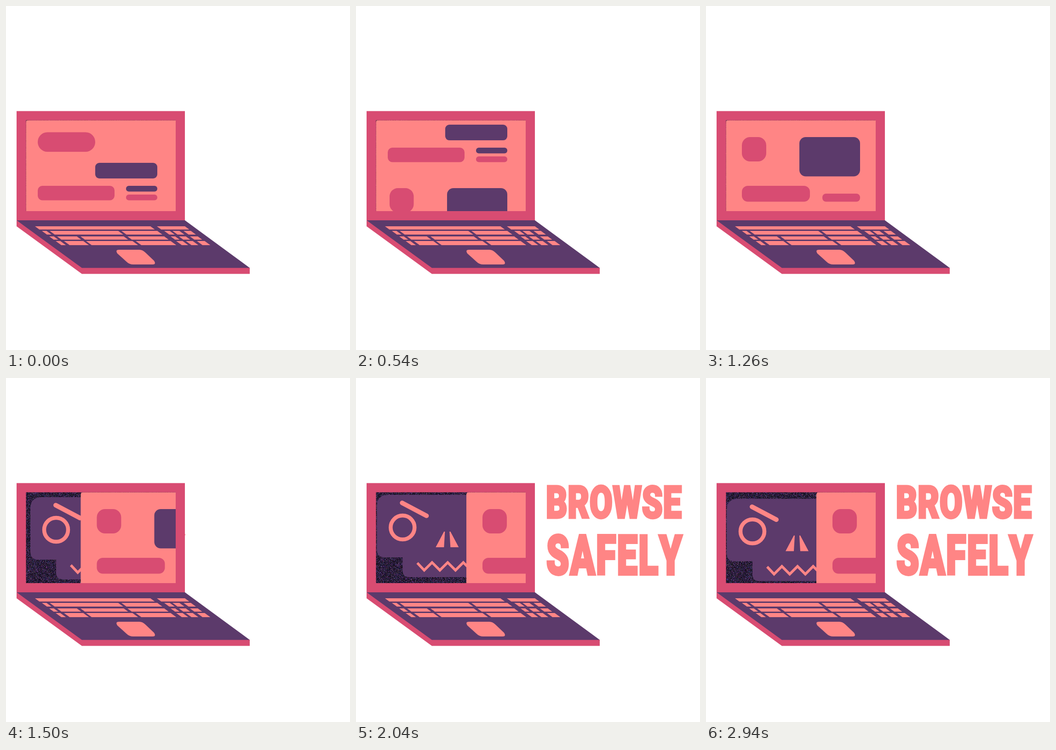
Animation, 748 px wide and 748 px high, one loop 3000 ms. Source, as an HTML page with a canvas:

```html
<!DOCTYPE html>
<html lang="en">
<head>
<meta charset="utf-8">
<title>Browse safely</title>
<style>
  html, body { margin: 0; width: 100%; height: 100%; overflow: hidden; background: #fff; }
  #noise { position: absolute; left: 43px; top: 248px; }
  svg { position: absolute; left: 0; top: 0; }
  .pink { fill: #d84c72; }
  .plum { fill: #5c3a6b; }
  .rose { fill: #ff8585; }
  .line { fill: none; stroke: #ff8585; }
  text {
    font-family: Roboto, "Liberation Sans", sans-serif;
    font-weight: 900;
    font-kerning: none;
    fill: #ff8585;
    stroke: #ff8585;
  }
</style>
</head>
<body>
<canvas id="noise" width="327" height="199"></canvas>
<svg width="748" height="748" viewBox="0 0 748 748">
  <defs>
    <clipPath id="screen"><rect x="43.5" y="248.5" width="325.5" height="197.5"/></clipPath>
    <clipPath id="outside"><rect x="389" y="200" width="359" height="260"/></clipPath>
  </defs>

  <g clip-path="url(#outside)">
    <g id="title">
      <text transform="translate(413 303.5) scale(.75 1)" font-size="96" letter-spacing="1" stroke-width="5">BROWSE</text>
      <text transform="translate(414 427) scale(.67 1)" font-size="118" letter-spacing="3.5" stroke-width="6">SAFELY</text>
    </g>
  </g>

  <g clip-path="url(#screen)">
    <g id="skull">
      <path class="plum" d="M76 255H400V434H122Q107 434 107 419V391H68Q51 391 51 374V280Q51 255 76 255Z"/>
      <circle class="line" cx="107" cy="326" r="26" stroke-width="8.500"/>
      <path class="line" d="M106 272.500L159 300.500" stroke-width="10" stroke-linecap="round"/>
      <path class="rose" d="M179 369L197 335H199L197 369ZM229 369L211 335H209L211 369Z"/>
      <path class="line" d="M139 403L154 419L171 402L188 419L205 402L222 419L239 402L256 419" stroke-width="5.500"/>
    </g>
    <g id="page">
      <path class="rose" d="M43 470V254Q43 248 49 248H380V470Z"/>
      <g id="feed"></g>
      <g id="face"></g>
    </g>
  </g>

  <path class="pink" fill-rule="evenodd" d="M23 228.500H389V466H23ZM43.500 248.500V446H369V248.500Z"/>
  <path class="pink" d="M23 466V479L165 582.500H530V569L165 560Z"/>
  <path class="plum" d="M23 466H389L530 569.500H165Z"/>
  <g id="keys" class="rose"></g>
  <path class="rose" d="M246 530H290Q297 530 303 536L322 554Q327 562 319 562H277Q268 562 262 556L242 538Q237 530 246 530Z"/>
</svg>
<script>
const LOOP = 3000, STEP = 60, SLANT = 1.365;
const $ = id => document.getElementById(id);

function add(parent, tag, attrs) {
  const el = document.createElementNS("http://www.w3.org/2000/svg", tag);
  for (const name in attrs) el.setAttribute(name, attrs[name]);
  parent.append(el);
}
const block = (parent, color, x, y, width, height, rx) =>
  add(parent, "rect", { class: color, x, y, width, height, rx });

const feed = $("feed"), face = $("face");
block(feed, "pink", 69, 274.5, 125, 42.5, 21);
block(feed, "plum", 194, 341, 135, 34, 9);
block(feed, "pink", 69, 391, 167, 31.5, 10);
block(feed, "plum", 261, 391, 68, 12.5, 6);
block(feed, "pink", 261, 410, 68, 12.5, 6);
block(feed, "pink", 73, 479, 52.5, 53, 18);
block(feed, "plum", 198, 479, 131, 86, 14);

block(face, "pink", 78, 285, 53, 53, 18);
block(face, "plum", 203, 285, 132, 85.5, 14);
block(face, "pink", 78, 391, 148, 34.5, 13);
block(face, "pink", 253, 408, 82, 17.5, 8);

// Each row: top, bottom, then the left and right end of every key.
const rows = [
  [479, 486, 63, 314, 328, 389],
  [489, 497, 78, 88, 95, 244, 251, 329, 344, 356, 362, 377, 386, 402],
  [501, 508, 94, 104, 111, 154, 162, 256, 264, 344, 358, 368, 376, 391, 400, 417],
  [511, 520, 108, 118, 126, 168, 174, 275, 282, 358, 370, 384, 391, 406, 415, 432]
];
for (const [top, bottom, ...ends] of rows) {
  const shift = (bottom - top) * SLANT;
  for (let i = 0; i < ends.length; i += 2) {
    const [a, b] = [ends[i], ends[i + 1]];
    add($("keys"), "path", { d: `M${a} ${top}H${b}L${b + shift} ${bottom}H${a + shift}Z` });
  }
}

const ctx = $("noise").getContext("2d");
const grain = ctx.createImageData(327, 199);
function drawNoise(seed) {
  let s = (seed * 7919 + 17) >>> 0;
  const rand = () => (s = (Math.imul(s, 1664525) + 1013904223) >>> 0) / 4294967296;
  const d = grain.data;
  for (let i = 0; i < d.length; i += 4) {
    const v = rand() ** 2;
    d[i] = 16 + v * 100 * rand() + v * 35;
    d[i + 1] = 12 + v * 75 * rand() + v * 20;
    d[i + 2] = 24 + v * 100 * rand() + v * 60;
    d[i + 3] = 255;
  }
  ctx.putImageData(grain, 0, 0);
}

const part = (t, from, to) => Math.min(1, Math.max(0, (t - from) / (to - from)));
const smooth = p => p * p * (3 - 2 * p);
const move = (id, x, y) => $(id).setAttribute("transform", `translate(${x.toFixed(2)} ${y.toFixed(2)})`);

// Skull drift: time, x, y
const drift = [
  [1200, -4, 7], [1500, 2, 4], [1740, 0, 0], [2070, -6, -1], [2400, -9.7, 3.4], [2940, -6, 7.5], [3000, -5, 7.5]
];
function driftAt(t) {
  if (t <= drift[0][0]) return drift[0].slice(1);
  const i = drift.findIndex(k => k[0] > t);
  const [a, b] = [drift[i - 1], drift[i]];
  const q = part(t, a[0], b[0]);
  const p = (q + smooth(q)) / 2;
  return [a[1] + (b[1] - a[1]) * p, a[2] + (b[2] - a[2]) * p];
}

function draw(t) {
  const p = part(t, 0, 1200);
  move("feed", 0, -194 * (0.9 * smooth(p) + 0.1 * p));
  feed.style.display = t < 1200 ? "" : "none";
  face.style.display = t < 1200 ? "none" : "";
  move("page", 197 * smooth(part(t, 1260, 1680)), 0);
  move("skull", ...driftAt(t));
  move("title", -335 * (1 - smooth(part(t, 1440, 1950))), 0);
  drawNoise(t / STEP);
}

const start = performance.now();
let shown = -1;
function tick() {
  const time = (performance.now() - start) % LOOP;
  const t = Math.floor(time / STEP) * STEP;
  if (t !== shown) draw(shown = t);
  requestAnimationFrame(tick);
}
tick();
</script>
</body>
</html>
```
